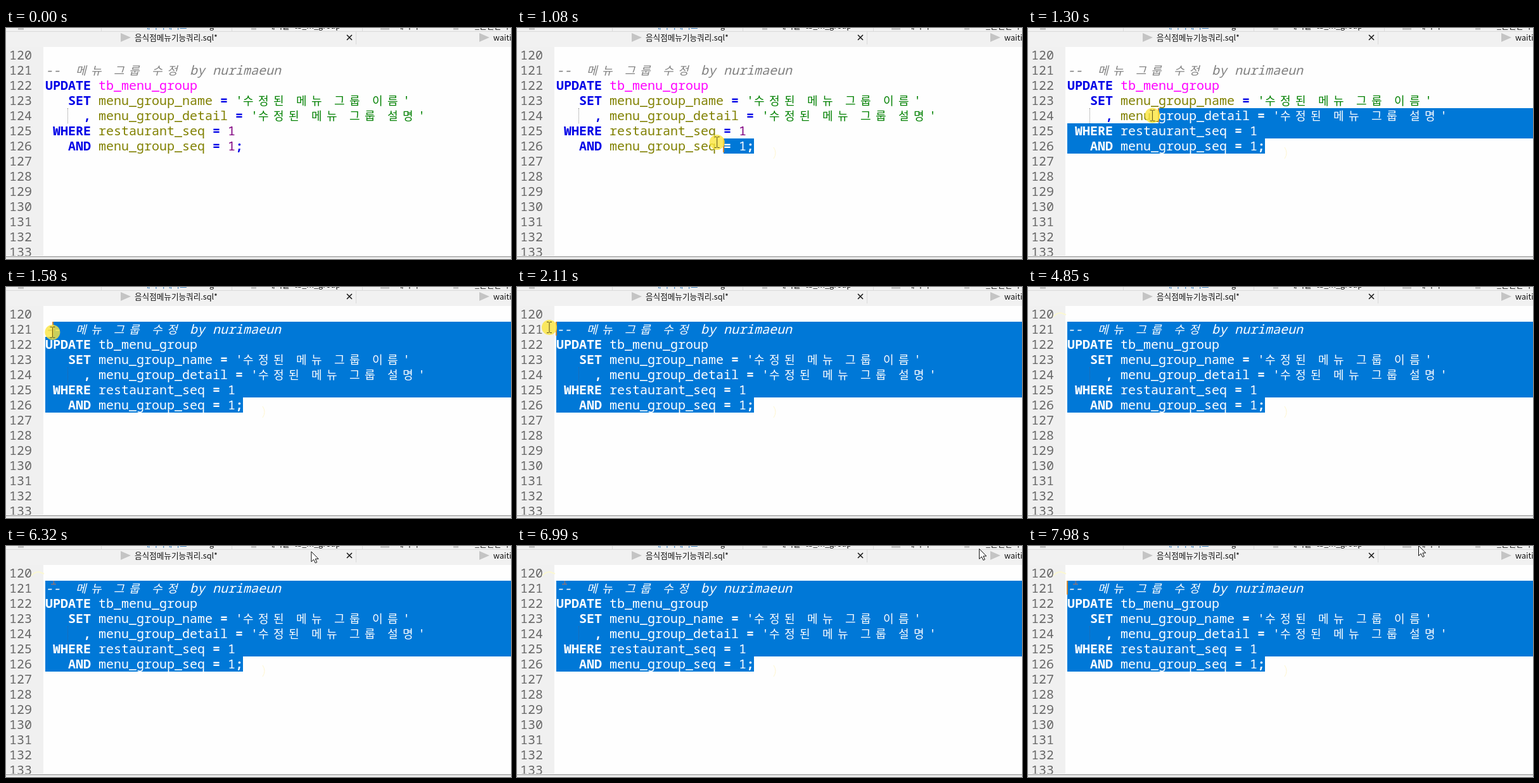
An HTML page for the animation above (8000 ms loop, 797x366 px).

```html
<!DOCTYPE html>
<html lang="ko">
<head>
<meta charset="utf-8">
<title>SQL editor</title>
<style>
html, body { margin: 0; width: 100%; height: 100%; overflow: hidden; background: #f0f0f0; }
#stage { position: relative; width: 797px; height: 366px; overflow: hidden; background: #f0f0f0; }
#stage svg, .layer { position: absolute; left: 0; top: 0; width: 797px; height: 366px; }
.ui { font: 12.6px "Noto Sans CJK KR", "Noto Sans CJK", "Noto Sans", sans-serif; }
.editor { position: absolute; left: 59px; top: 30px; right: 0; height: 331px; background: #fefefe; }
.line { position: absolute; left: 62px; height: 24px; font: 700 20px/24px "Noto Sans Mono", "DejaVu Sans Mono", monospace; white-space: pre; color: #0000e6; }
.line span { font-weight: 500; }
.line.num { left: 5px; color: #686868; font-weight: 500; }
.line b { display: inline-block; width: 24px; font: inherit; font-family: "Noto Sans CJK KR", "Noto Sans CJK", sans-serif; font-size: 18px; font-weight: 400; line-height: 0; }
.line .k { font-weight: 700; }
.line .t { color: #f0f; }
.line .f { color: #808000; }
.line .s { color: #008000; }
.line .n { color: #800080; }
.line .c { color: #808080; font-style: italic; font-weight: 400; }
#picked { background: #0078d7; }
#picked .line, #picked .line span { color: #fff; }
.guide { position: absolute; left: 97px; top: 127px; height: 24px; border-left: 1px dotted #909090; }
#picked .guide { border-color: #2a68a8; }
#caret { position: absolute; width: 2px; height: 22px; background: #d08a38; }
</style>
</head>
<body>
<div id="stage">
  <div class="editor"></div>
  <div class="layer" id="plain"></div>
  <div class="layer" id="picked"></div>
  <svg viewBox="0 0 797 366">
    <rect y="361" width="797" height="5" fill="#f0f0f0"/>
    <path d="M0 362.5H797" stroke="#8c8c8c"/>
    <rect width="797" height="30" fill="#f1f1f1"/>
    <path d="M0 5.5H797M150.5 0V5M356.5 0V5M562.5 0V5M768.5 0V5M552.5 6V26" stroke="#dadada" fill="none"/>
    <g fill="#c4c4c4">
      <path d="M181 8L197 15L181 22ZM747 8L763 15L747 22Z"/>
      <path d="M19 0h9v3h-9zM387 0h8v3h-8zM591 0h14v3h-14zM706 0h8v3h-8z"/>
    </g>
    <path d="M538 11L546 19M546 11L538 19" stroke="#111" stroke-width="1.5"/>
    <g class="ui" fill="#111">
      <text x="203" y="19.5">음식점메뉴기능쿼리.sql*</text>
      <text x="769" y="19.5">waiting.sql</text>
      <text x="216" y="1" fill="#2876bd">데이터베이스</text>
      <text x="321" y="1">g</text>
      <text x="413" y="1">테이블: tb_m_group</text>
      <text x="616" y="1">데이터</text>
      <text x="740" y="1">_권한관리</text>
    </g>
    <path id="pressMark" d="M405 189Q411 198 405 207" stroke="#fff6cf" fill="none"/>
    <path id="dragMark" d="M40 47Q45 41 52 41L60 44" stroke="#fbf8d2" stroke-width="2" fill="none"/>
    <path id="hoverMark" d="M75.500 55V60M71 60.500H79" stroke="#b5725a" fill="none"/>
  </svg>
  <div id="caret"></div>
  <svg viewBox="0 0 797 366">
    <circle id="halo" r="12" fill="#fbe53c" fill-opacity=".8"/>
    <path id="beam" d="M-4 -8.500H-1L0 -7.500L1 -8.500H4M0 -7.500V7.500M-4 8.500H-1L0 7.500L1 8.500H4" fill="none"/>
    <path id="arrow" d="M.5 .5V16.500L4.200 13L6.800 18.500L9.300 17.400L6.800 12H11.700Z" fill="#fff" stroke="#111"/>
  </svg>
</div>
<script>
const LOOP = 8000, LEFT = 62, TOP = 31, ROW = 24, CELL = 12, LAST = 6;
const PRESS = 945, RELEASE = 2380, BLINK = 535;
const $ = id => document.getElementById(id);
const span = (kind, text) => `<span class="${kind}">${text}</span>`;

const code = [
  '',
  span('c', '--  메뉴 그룹 수정 by nurimaeun'),
  span('k', 'UPDATE') + ' ' + span('t', 'tb_menu_group'),
  '   ' + span('k', 'SET') + ' ' + span('f', 'menu_group_name') + ' = ' + span('s', "'수정된 메뉴 그룹 이름'"),
  '     , ' + span('f', 'menu_group_detail') + ' = ' + span('s', "'수정된 메뉴 그룹 설명'"),
  ' ' + span('k', 'WHERE') + ' ' + span('f', 'restaurant_seq') + ' = ' + span('n', '1'),
  '   ' + span('k', 'AND') + ' ' + span('f', 'menu_group_seq') + ' = ' + span('n', '1') + ';'
];
const lengths = code.map(s => s.replace(/<[^>]+>/g, '').replace(/[가-힣]/g, '..').length);

const line = (html, row, kind = '') =>
  `<div class="line ${kind}" style="top:${TOP + row * ROW}px">${html.replace(/[가-힣]/g, '<b>$&</b>')}</div>`;
const body = code.map((s, i) => line(s, i)).join('') + '<div class="guide"></div>';
const numbers = Array.from({ length: 14 }, (_, i) => line(String(120 + i), i, 'num')).join('');
$('plain').innerHTML = numbers + body;
$('picked').innerHTML = body;

const smooth = u => u * u * (3 - 2 * u);
const slowDown = u => 1 - (1 - u) ** 2;
const dip = u => u + 1.85 * Math.sin(Math.PI * u);
const dragX = u => 1 - (1 - u) ** 1.26;
const dragY = u => u ** 1.3;

function pointer(t) {
  let x = 604, y = 148;
  const glide = (from, to, toX, toY, easeX = smooth, easeY = easeX) => {
    const u = Math.min(1, Math.max(0, (t - from) / (to - from)));
    x += (toX - x) * easeX(u);
    y += (toY - y) * easeY(u);
  };
  glide(130, 900, 396, 198, smooth, dip);
  glide(PRESS, 1660, 52, 51, dragX, dragY);
  glide(2040, 2110, 51, 64);
  glide(RELEASE, 2440, 51, 67);
  glide(4180, 4320, 25, 74);
  glide(5300, 5310, 75, 54);
  glide(5650, 6390, 485, 8, slowDown);
  glide(6460, 7200, 788, 3);
  glide(7200, 7330, 615, 1);
  glide(7920, 7980, 616, -1);
  return [x, y];
}

const show = (id, on) => { $(id).style.visibility = on ? 'visible' : 'hidden'; };

function selection(x, y) {
  const row = Math.min(LAST, Math.max(0, Math.floor((y - TOP) / ROW)));
  const col = Math.min(lengths[row], Math.max(0, Math.ceil((x - LEFT) / CELL)));
  return { row, x: LEFT + col * CELL, y: TOP + row * ROW };
}

function clip({ row, x, y }) {
  const end = LEFT + lengths[LAST] * CELL, last = TOP + LAST * ROW, bottom = last + ROW;
  const points = row === LAST
    ? [[x, y], [end, y], [end, bottom], [x, bottom]]
    : [[x, y], [797, y], [797, last], [end, last], [end, bottom], [LEFT, bottom], [LEFT, y + ROW], [x, y + ROW]];
  return `polygon(${points.map(p => `${p[0]}px ${p[1]}px`).join(',')})`;
}

function draw(t) {
  const [x, y] = pointer(t);
  const picked = t >= PRESS, dragging = picked && t < RELEASE, returned = t >= 5310;
  const visible = t >= 130 && (t < 4320 || returned);
  const isArrow = t >= RELEASE && (!returned || y < 30);

  const start = selection(...pointer(Math.min(t, RELEASE)));
  show('picked', picked);
  $('picked').style.clipPath = clip(start);

  show('halo', dragging);
  show('beam', visible && !isArrow);
  show('arrow', visible && isArrow);
  for (const id of ['halo', 'beam', 'arrow'])
    $(id).setAttribute('transform', `translate(${x.toFixed(1)} ${y.toFixed(1)})`);
  $('beam').setAttribute('stroke', returned ? '#d78a4a' : picked ? '#5a5018' : '#222');

  const blinkOn = Math.floor((t - 2170) / BLINK) % 2 === 0;
  show('caret', dragging || picked && blinkOn);
  $('caret').style.left = start.x - 1 + 'px';
  $('caret').style.top = start.y + 'px';

  show('pressMark', t >= 1010);
  show('dragMark', t >= 2180);
  show('hoverMark', t >= 5650);
}

function frame(now) {
  draw(now % LOOP);
  requestAnimationFrame(frame);
}
draw(0);
requestAnimationFrame(frame);
</script>
</body>
</html>
```
